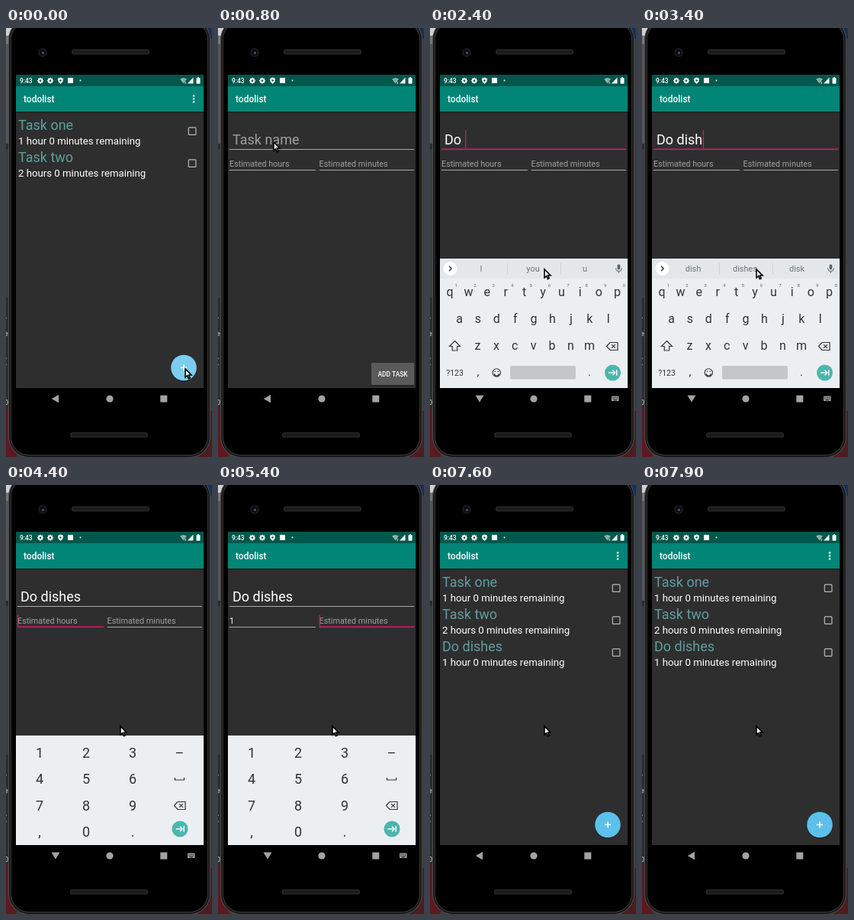
An HTML page with a canvas that plays this animation: 270x560 px, repeating every 8000 ms.

```html
<!DOCTYPE html>
<html lang="en">
<head>
<meta charset="utf-8">
<title>todolist</title>
<style>
html, body { margin: 0; width: 100%; height: 100%; overflow: hidden; background: #000; }
canvas { display: block; width: 270px; height: 560px; }
</style>
</head>
<body>
<canvas id="stage"></canvas>
<script>
const LOOP = 8000;
const canvas = document.getElementById('stage');
const c = canvas.getContext('2d');
const ratio = window.devicePixelRatio || 1;
canvas.width = 270 * ratio;
canvas.height = 560 * ratio;

const DARK = '#2e2e2e', TEAL = '#008577', PINK = '#d81b60', KEY = '#2b3439', GREY = '#a3a3a3';

const clamp = v => Math.max(0, Math.min(1, v));
const progress = (t, start, length) => clamp((t - start) / length);
const easeOut = p => 1 - (1 - p) ** 2;
const easeBoth = p => p * p * (3 - 2 * p);
const mix = (a, b, p) => a + (b - a) * p;

function rect(x, y, w, h, color) {
  c.fillStyle = color;
  c.fillRect(x, y, w, h);
}
function round(x, y, w, h, r, color) {
  c.fillStyle = color;
  c.beginPath();
  c.roundRect(x, y, w, h, r);
  c.fill();
}
function disc(x, y, r, color) {
  c.fillStyle = color;
  c.beginPath();
  c.arc(x, y, r, 0, 7);
  c.fill();
}
function path(points, { fill, stroke, width = 1, close = true }) {
  c.beginPath();
  points.forEach(([x, y]) => c.lineTo(x, y));
  if (close) c.closePath();
  if (fill) { c.fillStyle = fill; c.fill(); }
  if (stroke) { c.strokeStyle = stroke; c.lineWidth = width; c.stroke(); }
}
function text(str, x, y, size, color, align = 'left', weight = 400) {
  c.font = `${weight} ${size}px Roboto, sans-serif`;
  c.fillStyle = color;
  c.textAlign = align;
  c.fillText(str, x, y);
  return c.measureText(str).width;
}

// Typed input: [time, value] steps
const nameSteps = [[0, ''], [1950, 'D'], [2100, 'Do'], [2300, 'Do '], [2800, 'Do d'], [2950, 'Do di'],
  [3100, 'Do dis'], [3250, 'Do dish'], [3450, 'Do dishe'], [3600, 'Do dishes']];
const hints = {
  '': ['I', 'The', "I'm"], 'D': ['D', 'Do', 'Did'], 'Do': ['Do', "Don't", 'Does'], 'Do ': ['I', 'you', 'u'],
  'Do d': ['d', 'do', 'did'], 'Do di': ['di', 'did', 'die'], 'Do dis': ['dis', 'did', 'disc'],
  'Do dish': ['dish', 'dishes', 'disk'], 'Do dishe': ['dishe', 'dishes', 'dished'],
  'Do dishes': ['dished', 'dishes', 'dish']
};
const latest = (steps, t) => steps.filter(s => s[0] <= t).pop();
const focusSteps = [[0, ''], [1050, 'name'], [4100, 'hours'], [5100, 'minutes'], [6600, 'button']];

function surroundings() {
  rect(0, 0, 270, 560, '#3c3c3c');
  rect(0, 0, 12, 10, '#d0d0d0');
  rect(0, 10, 6, 11, '#777');
  rect(0, 21, 6, 130, '#555');
  rect(0, 151, 6, 7, '#2a2a2a');
  rect(0, 352, 6, 144, '#2c2c2e');
  rect(0, 496, 14, 64, '#5a1a20');
  rect(255, 0, 15, 14, '#15305c');
  rect(264, 14, 6, 140, '#353c48');
  rect(250, 500, 20, 60, '#4c1c20');
  [['r', 383], ['e', 402], ['(', 438], ['0', 492]].forEach(([s, y]) => text(s, -2, y, 9, '#ddd'));
}

function phoneBody() {
  const shell = (x, y, w, h, r, color) => round(x, y, w, h, r, color);
  shell(3, -12, 265, 573, 27, '#505050');
  shell(4, -11, 263, 571, 26, '#191919');
  shell(6, -9, 259, 567, 24, '#383838');
  shell(7, -8, 257, 565, 23, '#000');
  for (const [x, y] of [[86, 28], [84, 528]]) {
    round(x, y, 102, 6.5, 3, '#303030');
    round(x + 1, y + 1, 100, 4.5, 2.2, '#1b1b1b');
  }
  disc(48, 32, 5.8, '#1d1d22');
  disc(48, 32, 4, '#090b12');
  disc(48.5, 32.5, 1.6, '#46567c');
}

function gear(x, y) {
  for (let i = 0; i < 8; i++) {
    const a = i * Math.PI / 4;
    disc(x + 3 * Math.cos(a), y + 3 * Math.sin(a), 1, '#fff');
  }
  disc(x, y, 3, '#fff');
  disc(x, y, 1.3, '#00574b');
}

function statusBar() {
  rect(13, 61, 246, 15, '#00574b');
  text('9:43', 18, 72, 8.4, '#fff', 'left', 500);
  gear(45, 68.7);
  gear(58, 68.7);
  path([[71.5, 64.5], [75, 66], [74.5, 70], [71.5, 73], [68.5, 70], [68, 66]], { fill: '#fff' });
  disc(71.5, 68.5, 1.2, '#00574b');
  rect(81, 65, 7, 7, '#fff');
  disc(97.5, 68.5, 1, '#fff');
  path([[228, 66.5], [232.5, 65], [237, 66.5], [232.5, 72.5]], { fill: '#8fb0aa' });
  text('x', 234, 73, 5, '#fff');
  path([[245.5, 64.5], [245.5, 72.5], [238, 72.5]], { fill: '#fff' });
  round(249.5, 65.2, 5, 7.5, 0.8, '#fff');
  rect(251, 64.2, 2, 1.5, '#fff');
}

function appBar(menu) {
  rect(13, 76, 246, 33, TEAL);
  text('todolist', 23, 97, 12, '#fff', 'left', 500);
  if (menu) [88.5, 92.5, 96.5].forEach(y => disc(246, y, 1.25, '#fff'));
  const shade = c.createLinearGradient(0, 109, 0, 112);
  shade.addColorStop(0, 'rgba(0,0,0,.35)');
  shade.addColorStop(1, 'rgba(0,0,0,0)');
  rect(13, 109, 246, 3, shade);
}

function listScreen(t) {
  rect(13, 76, 246, 394, DARK);
  appBar(true);
  const tasks = [['Task one', '1 hour'], ['Task two', '2 hours']];
  if (t > 4000) tasks.push(['Do dishes', '1 hour']);
  tasks.forEach(([name, left], i) => {
    const y = i * 42;
    text(name, 16, 133 + y, 18, '#5f9ea0');
    text(left + ' 0 minutes remaining', 16, 152 + y, 13.2, '#fff');
    c.strokeStyle = '#b9b9b9';
    c.lineWidth = 1.2;
    c.beginPath();
    c.roundRect(239.3, 129.8 + y, 9.6, 9.6, 1);
    c.stroke();
  });
  disc(233, 445, 17, 'rgba(0,0,0,.25)');
  disc(233, 443.5, 16.8, '#5bc0eb');
  if (t < 600) disc(233, 443.5, 16.8, `rgba(255,255,255,${0.2 * (1 - progress(t, 250, 300))})`);
  rect(229, 442.6, 8, 1.6, '#fff');
  rect(232.2, 439.4, 1.6, 8, '#fff');
}

function field(x, right, base, lineY, size, value, hint, focused, caretOn) {
  const w = text(value || hint, x, base, size, value ? '#fff' : '#a0a0a0');
  const left = size > 12 ? x - 4 : x;
  if (focused) rect(left, lineY - 0.5, right - left, 1.6, PINK);
  else rect(left, lineY, right - left, 1, '#a8a8a8');
  if (focused && caretOn) {
    const cx = value ? x + w + 0.5 : x;
    rect(cx, base - size * 1.04, 1.3, size * 1.32, PINK);
  }
}

function formScreen(t, dy) {
  c.save();
  c.translate(0, dy);
  rect(13, 76, 246, 560, DARK);
  appBar(false);
  const [since, focus] = latest(focusSteps, t);
  const [typedAt, name] = latest(nameSteps, t);
  const hours = t >= 4700 ? '1' : '', minutes = t >= 6000 ? '0' : '';
  const edits = [since, typedAt, hours ? 4700 : 0, minutes ? 6000 : 0];
  const caretOn = (t - Math.max(...edits)) % 1000 < 500;
  field(19, 257, 152, 158, 18, name, 'Task name', focus === 'name', caretOn);
  field(15, 128, 181, 185, 10.8, hours, 'Estimated hours', focus === 'hours', caretOn);
  field(132.6, 257, 181, 185, 10.8, minutes, 'Estimated minutes', focus === 'minutes', caretOn);
  round(201, 438, 56, 29.5, 1.5, 'rgba(0,0,0,.35)');
  round(201, 437, 56, 29, 1.5, focus === 'button' ? '#6b6b6b' : '#5a5a5a');
  text('ADD TASK', 229, 455, 8.4, '#fff', 'center', 500);
  c.restore();
}

function backspace(x, y) {
  path([[x - 7.5, y], [x - 3, y - 5], [x + 7, y - 5], [x + 7, y + 5], [x - 3, y + 5]], { stroke: KEY, width: 1.2 });
  path([[x - 1, y - 2.4], [x + 4, y + 2.4]], { stroke: KEY, width: 1.2, close: false });
  path([[x - 1, y + 2.4], [x + 4, y - 2.4]], { stroke: KEY, width: 1.2, close: false });
}

function actionKey(x, y, enter) {
  const line = pts => path(pts, { stroke: '#fff', width: 1.4, close: false });
  disc(x, y, 10.5, '#4db6ac');
  if (enter) {
    line([[x + 5, y - 3], [x + 5, y], [x - 5, y]]);
    line([[x - 2, y - 3], [x - 5, y], [x - 2, y + 3]]);
  } else {
    line([[x - 5.5, y], [x + 3, y]]);
    line([[x, y - 3.2], [x + 3.2, y], [x, y + 3.2]]);
    line([[x + 5.2, y - 3.8], [x + 5.2, y + 3.8]]);
  }
}

function letterKeys(value, plain) {
  rect(13, 301, 246, 169, '#eceff1');
  rect(13, 301, 246, 26, plain ? '#e2e6e9' : '#e4e7ea');
  const keyX = (first, i) => first + 24.4 * i;
  if (plain) {
    [...'1234567890'].forEach((d, i) => text(d, keyX(26, i), 319, 12.5, KEY, 'center'));
  } else {
    disc(26.5, 314, 9, '#fff');
    path([[25, 310.8], [28.2, 314], [25, 317.2]], { stroke: KEY, width: 1.3, close: false });
    hints[value].forEach((s, i) => text(s, 67 + 68 * i, 318, 11, '#6c757a', 'center'));
    rect(101, 307, 1, 14, '#cdd1d4');
    rect(171, 307, 1, 14, '#cdd1d4');
    round(245.6, 308.5, 3.6, 7, 1.8, '#59636a');
    path([[243.5, 313.5], [244.5, 316.8], [247.4, 317.6], [250.3, 316.8], [251.3, 313.5]],
      { stroke: '#59636a', close: false });
    rect(246.9, 317.5, 1, 2.5, '#59636a');
  }
  const caps = !plain && value === '';
  [['qwertyuiop', 26, 350], ['asdfghjkl', 38.5, 385], ['zxcvbnm', 62.5, 420]].forEach(([row, x, y], r) => {
    [...row].forEach((k, i) => {
      text(caps ? k.toUpperCase() : k, keyX(x, i), y, 16, KEY, 'center');
      if (r === 0 && !plain) text((i + 1) % 10, keyX(x, i) + 8.5, 338, 6, '#59636a', 'center');
    });
  });
  path([[32.5, 408.5], [39.5, 415.5], [35.7, 415.5], [35.7, 421], [29.3, 421], [29.3, 415.5], [25.5, 415.5]],
    { stroke: KEY, width: 1.2, fill: caps ? KEY : null });
  backspace(239, 415.5);
  text('?123', 32.5, 453.5, 10.5, KEY, 'center');
  text(',', 63, 454, 15, KEY, 'center');
  text('.', 209, 454, 15, KEY, 'center');
  if (!plain) {
    c.strokeStyle = KEY;
    c.lineWidth = 1.1;
    c.beginPath();
    c.arc(87.3, 450, 5.2, 0, 7);
    c.moveTo(90.3, 451);
    c.arc(87.3, 451, 3, 0, Math.PI);
    c.stroke();
    disc(85.4, 448.3, 0.8, KEY);
    disc(89.2, 448.3, 0.8, KEY);
  }
  const spaceX = plain ? 81 : 105;
  round(spaceX, 441, 191 - spaceX, 17.5, 2, '#c3c7ca');
  actionKey(239.5, 450, plain);
}

function numberKeys() {
  rect(13, 327, 246, 143, '#eceff1');
  ['123–', '456', '789', ',0.'].forEach((row, r) => {
    [...row].forEach((k, i) => text(k, 44 + 61 * i + (i === 3 ? 0.5 : 0), 355.5 + 34.6 * r, 18, KEY, 'center'));
  });
  path([[221.5, 382], [221.5, 385], [233.5, 385], [233.5, 382]], { stroke: KEY, width: 1.2, close: false });
  backspace(228, 418.5);
  actionKey(228, 449, false);
}

function keyboard(t) {
  const rise = easeOut(progress(t, 1150, 250)) * (1 - easeBoth(progress(t, 7200, 200)));
  if (rise <= 0) return;
  c.save();
  c.translate(0, 169 * (1 - rise));
  if (t >= 4150 && t < 6700) numberKeys();
  else letterKeys(latest(nameSteps, t)[1], t >= 6700);
  c.restore();
}

function navBar(open) {
  rect(13, 470, 246, 28, '#000');
  path(open ? [[59.5, 479.5], [70.5, 479.5], [65, 488.5]] : [[69, 478.8], [69, 489.2], [59.8, 484]], { fill: GREY });
  disc(136, 484, 4.6, GREY);
  rect(202.3, 479.5, 9, 9, GREY);
  if (!open) return;
  round(238, 480.5, 9.5, 6.5, 0.8, GREY);
  for (let i = 0; i < 4; i++) {
    rect(239.2 + i * 2, 481.8, 1, 1, '#000');
    rect(239.2 + i * 2, 483.6, 1, 1, '#000');
  }
  rect(240.5, 485.4, 4.5, 0.9, '#000');
}

function pointer(t) {
  const a = easeBoth(progress(t, 300, 450)), b = easeBoth(progress(t, 1250, 450));
  const x = mix(mix(235, 73, a), 150, b), y = mix(mix(445, 149, a), 315, b);
  const shape = [[0, 0], [0, 11], [2.6, 8.7], [4.4, 12.6], [6.2, 11.8], [4.5, 8], [8, 8]];
  path(shape.map(([px, py]) => [x + px, y + py]), { stroke: '#000', width: 1.6, fill: '#fff' });
}

function screenContent(t) {
  c.save();
  c.beginPath();
  c.rect(13, 61, 246, 409);
  c.clip();
  const enter = easeOut(progress(t, 250, 300));
  const leave = easeOut(progress(t, 7150, 250));
  if (enter < 1 || leave === 1) {
    listScreen(t);
  }
  if (enter > 0 && leave < 1) {
    c.globalAlpha = enter;
    const pan = -165 * easeOut(progress(t, 6650, 380));
    formScreen(t, pan + 24 * (1 - enter));
    c.globalAlpha = 1;
  }
  if (leave > 0 && leave < 1) {
    c.save();
    c.globalAlpha = leave;
    c.translate(0, 24 * (1 - leave));
    listScreen(t);
    c.restore();
  }
  keyboard(t);
  statusBar();
  c.restore();
}

function draw(now) {
  const t = now % LOOP;
  c.setTransform(ratio, 0, 0, ratio, 0, 0);
  surroundings();
  phoneBody();
  screenContent(t);
  navBar(t >= 1200 && t < 7250);
  pointer(t);
}

const start = performance.now();
function tick() {
  draw(performance.now() - start);
  requestAnimationFrame(tick);
}
tick();
</script>
</body>
</html>
```
